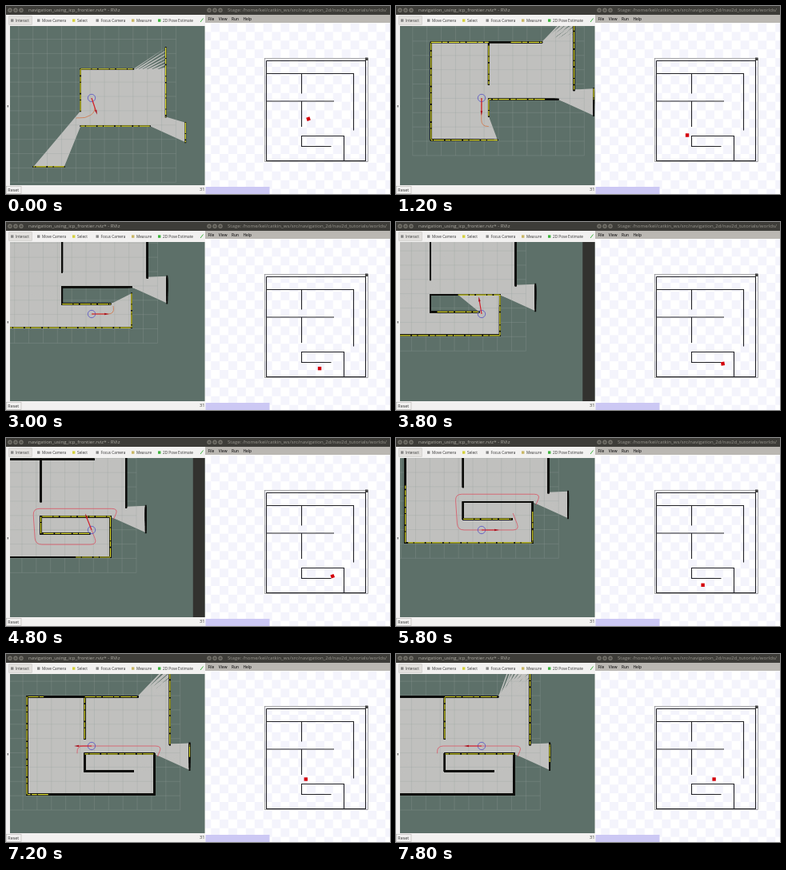
An HTML page with a canvas that plays this animation: 480x235 px, repeating every 8000 ms.

```html
<!DOCTYPE html>
<html lang="en">
<head>
<meta charset="utf-8">
<title>Robot exploration</title>
<style>
html, body { margin: 0; width: 100%; height: 100%; overflow: hidden; background: #f2f1f0; }
canvas { display: block; width: 480px; height: 235px; }
svg { position: absolute; visibility: hidden; }
</style>
</head>
<body>
<canvas id="stage"></canvas>
<svg width="0" height="0"><path id="outbound"/><path id="inbound"/></svg>
<script>
const W = 480, H = 235, LOOP = 8000, STEP = 200;
const ZOOM = 1.64, RAYS = 720, METRE = 10.9;
const canvas = document.getElementById('stage');
const ctx = canvas.getContext('2d');
const dpr = window.devicePixelRatio || 1;
canvas.width = W * dpr;
canvas.height = H * dpr;

// Polylines of the maze, in simulator pixels
const maze = [
  [[325, 68], [449, 68], [449, 193], [325, 193], [325, 68]],
  [[325, 84], [434, 84], [434, 155]],
  [[369, 84], [369, 109]],
  [[325, 118.5], [409.5, 118.5]],
  [[369, 118.5], [369, 150.5]],
  [[422, 193], [422, 162], [369, 162], [369, 175], [406, 175]]
];
const walls = maze.flatMap(line => line.slice(1).map((end, i) => [...line[i], ...end]));

// A polyline with its corners rounded off
function roundedPath(points, radius = 5) {
  const toward = ([x, y], [x2, y2]) => {
    const length = Math.hypot(x2 - x, y2 - y), k = Math.min(radius, length / 2) / length;
    return [x + (x2 - x) * k, y + (y2 - y) * k];
  };
  return points.map((p, i) => {
    if (i === 0) return `M${p}`;
    if (i === points.length - 1) return `L${p}`;
    return `L${toward(p, points[i - 1])}Q${p} ${toward(p, points[i + 1])}`;
  }).join('');
}

function makeDrive(id, start, speed, turn, corners) {
  const curve = document.getElementById(id), d = roundedPath(corners);
  curve.setAttribute('d', d);
  return { curve, start, speed, turn, shape: new Path2D(d), length: curve.getTotalLength() };
}

// Forward into the dead end, then out again in reverse
const outbound = makeDrive('outbound', 0, 0.0266, 0, [
  [377.5, 140.6], [381, 151], [372.5, 156.3], [363.6, 155.2],
  [363.4, 182.6], [409, 182.6], [407, 170.5]
]);
const inbound = makeDrive('inbound', 4750, 0.038, Math.PI, [
  [407, 170.5], [412, 183.3], [364.8, 183.3], [363, 156], [428, 156], [424.5, 164]
]);
const goals = [26, 57, 101];

function poseAt(time) {
  const drive = time < inbound.start ? outbound : inbound;
  const travelled = Math.min((time - drive.start) * drive.speed, drive.length);
  const mid = Math.max(0.3, Math.min(drive.length - 0.3, travelled));
  const a = drive.curve.getPointAtLength(mid - 0.3), b = drive.curve.getPointAtLength(mid + 0.3);
  const { x, y } = drive.curve.getPointAtLength(travelled);
  return { x, y, drive, travelled, angle: Math.atan2(b.y - a.y, b.x - a.x) + drive.turn };
}

function castRay(x, y, angle) {
  const dx = Math.cos(angle), dy = Math.sin(angle);
  let best = 400, wall = -1;
  walls.forEach(([x1, y1, x2, y2], i) => {
    const ex = x2 - x1, ey = y2 - y1, det = dx * ey - dy * ex;
    if (Math.abs(det) < 1e-9) return;
    const dist = ((x1 - x) * ey - (y1 - y) * ex) / det;
    const along = ((x1 - x) * dy - (y1 - y) * dx) / det;
    if (dist > 0 && dist < best && along >= 0 && along <= 1) {
      best = dist;
      wall = i;
    }
  });
  return { x: x + dx * best, y: y + dy * best, wall };
}

// One laser sweep: the free area and the stretches of wall it touched
function scan({ x, y }) {
  const area = new Path2D(), edges = new Path2D();
  let lastWall = -1;
  for (let i = 0; i < RAYS; i++) {
    const hit = castRay(x, y, (i + 0.5) / RAYS * 2 * Math.PI);
    edges[hit.wall === lastWall ? 'lineTo' : 'moveTo'](hit.x, hit.y);
    lastWall = hit.wall;
    // Sparse returns through the upper gap leave a comb of rays
    const sparse = hit.y < 117 && hit.x > 405 && i % 4 < 2;
    const cut = sparse ? (118.5 - y) / (hit.y - y) : 1;
    area.lineTo(x + (hit.x - x) * cut, y + (hit.y - y) * cut);
  }
  area.closePath();
  return { area, edges };
}
const scans = Array.from({ length: LOOP / STEP }, (_, i) => scan(poseAt(i * STEP)));

function rect(color, x, y, w, h) {
  ctx.fillStyle = color;
  ctx.fillRect(x, y, w, h);
}

function disc(color, x, y, r) {
  ctx.fillStyle = color;
  ctx.beginPath();
  ctx.arc(x, y, r, 0, 7);
  ctx.fill();
}

function stroke(color, width, points) {
  ctx.strokeStyle = color;
  ctx.lineWidth = width;
  ctx.beginPath();
  points.forEach(([x, y]) => ctx.lineTo(x, y));
  ctx.stroke();
}

function strokeShape(color, width, shape, dash = []) {
  ctx.strokeStyle = color;
  ctx.lineWidth = width;
  ctx.setLineDash(dash);
  ctx.stroke(shape);
  ctx.setLineDash([]);
}

function label(text, x, y, size = 4.7, color = '#333', weight = 400) {
  ctx.font = `${weight} ${size}px "Open Sans", sans-serif`;
  ctx.fillStyle = color;
  ctx.fillText(text, x, y);
}

function clipped(x, y, w, h, draw) {
  ctx.save();
  ctx.beginPath();
  ctx.rect(x, y, w, h);
  ctx.clip();
  draw();
  ctx.restore();
}

function drawGrid() {
  const left = 311, top = 74, cells = 12, size = cells * METRE, color = 'rgba(150,160,155,.35)';
  for (let i = 0; i <= cells; i++) {
    const d = i * METRE;
    stroke(color, 0.5, [[left + d, top], [left + d, top + size]]);
    stroke(color, 0.5, [[left, top + d], [left + size, top + d]]);
  }
}

// Outbound plans reach from the robot to the next goal; the way back is replanned once
function drawPlan({ drive, travelled }) {
  const replan = 78;
  const out = drive === outbound;
  const from = out ? travelled : Math.floor(travelled / replan) * replan;
  const to = out ? goals.find(goal => goal > travelled) : drive.length;
  if (to) strokeShape(out ? '#d2703f' : '#dd4a5c', 0.45, drive.shape, [0, from, to - from, 999]);
}

function drawMap(time, pose) {
  rect('#5d7069', 5, 25, 244, 199);
  ctx.translate(107, 115);
  ctx.save();
  ctx.scale(ZOOM, ZOOM);
  ctx.translate(-pose.x, -pose.y);
  rect('#32322f', 485, 0, 200, 400);
  const index = time / STEP, seen = scans.slice(0, index + 1);
  ctx.fillStyle = '#c0c0be';
  seen.forEach(s => ctx.fill(s.area));
  drawGrid();
  ctx.lineCap = 'square';
  seen.forEach(s => strokeShape('#0c0c0a', 1.2, s.edges));
  ctx.lineCap = 'butt';
  strokeShape('#e2e234', 0.75, scans[index].edges, [8, 0.6, 4, 1]);
  drawPlan(pose);
  ctx.restore();

  ctx.strokeStyle = '#5350c4';
  ctx.lineWidth = 0.8;
  ctx.beginPath();
  ctx.arc(0, 0, 4.7, 0, 7);
  ctx.stroke();
  ctx.rotate(pose.angle);
  stroke('#d0202c', 1.2, [[0, 0], [17, 0]]);
  ctx.fillStyle = '#a81420';
  ctx.beginPath();
  ctx.moveTo(16, -1.3);
  ctx.lineTo(22, 0);
  ctx.lineTo(16, 1.3);
  ctx.fill();
}

function drawSimulator(pose) {
  rect('#fff', 249, 21, 231, 214);
  for (let col = -13; col < 9; col++)
    for (let row = -11; row < 10; row++)
      if ((col + row) % 2 === 0) {
        rect('#f4f4fc', 387 + col * METRE, 130.5 + row * METRE, METRE, METRE);
      }
  ctx.translate(0.5, 0.5);
  ctx.strokeStyle = '#888';
  ctx.lineWidth = 0.7;
  ctx.strokeRect(323, 65, 129, 129);
  rect('#444', 448.5, 64, 3.5, 3.5);
  maze.forEach(line => stroke('#222226', 1.1, line));
  rect('#ccc8f4', 249, 225.5, 80, 9);
  ctx.translate(pose.x, pose.y);
  ctx.rotate(pose.angle);
  rect('#d4000c', -2.2, -2.2, 4.4, 4.4);
}

function drawTitle(x, width, text, color) {
  clipped(x, 0, width, 11, () => {
    rect('#3d3c38', x, 0, width, 11);
    [5, 12, 19].forEach(d => {
      disc('#77756e', x + d, 5.2, 2.7);
      disc('#55534d', x + d, 5.2, 1.5);
    });
    label(text, x + 28, 7.2, 6.1, color);
  });
}

function drawToolbar() {
  rect('#f2f1f0', 0, 11, 249, 14);
  rect('#bcbab6', 3.5, 12.5, 29, 11);
  rect('#e2e0dd', 4, 13, 28, 10);
  [
    ['Interact', 12, '#888'], ['Move Camera', 45, '#888'], ['Select', 89, '#d6d23c'],
    ['Focus Camera', 118.5, '#888'], ['Measure', 163, '#c9b765'], ['2D Pose Estimate', 196, '#3cb43c']
  ].forEach(([text, x, color]) => {
    rect(color, x - 6, 16.4, 3.4, 3.4);
    label(text, x, 19.6);
  });
  stroke('#3cb43c', 1, [[243, 20], [246.5, 15.5]]);
}

function drawMenu() {
  rect('#bab7b2', 249, 11, 231, 10.5);
  let x = 252.5;
  ['File', 'View', 'Run', 'Help'].forEach(text => {
    label(text, x, 17.8, 4.7, '#222', 600);
    x += ctx.measureText(text).width + 5.5;
  });
}

function drawWindows() {
  rect('#f2f1f0', 0, 0, W, H);
  drawTitle(0, 249, 'navigation_using_icp_frontier.rviz* - RViz', '#b0aea6');
  drawTitle(249, 231, 'Stage: /home/kel/catkin_ws/src/navigation_2d/nav2d_tutorials/worlds/', '#98968e');
  drawToolbar();
  drawMenu();
  rect('#666', 1.7, 124, 1.3, 2.5);
  ctx.strokeStyle = '#b8b6b2';
  ctx.lineWidth = 0.6;
  ctx.strokeRect(0.5, 225.5, 18.5, 9);
  label('Reset', 2.3, 232.2, 5.4);
  clipped(240, 224, 9, 11, () => label('31 fps', 242, 231, 5.6));
}

function render(time) {
  const pose = poseAt(time);
  ctx.setTransform(dpr, 0, 0, dpr, 0, 0);
  drawWindows();
  clipped(5, 25, 243.5, 199, () => drawMap(time, pose));
  clipped(249, 21, 231, 214, () => drawSimulator(pose));
}

let shown = -1;
function tick() {
  const time = Math.floor(performance.now() % LOOP / STEP) * STEP;
  if (time !== shown) render(shown = time);
  requestAnimationFrame(tick);
}
tick();
</script>
</body>
</html>
```
